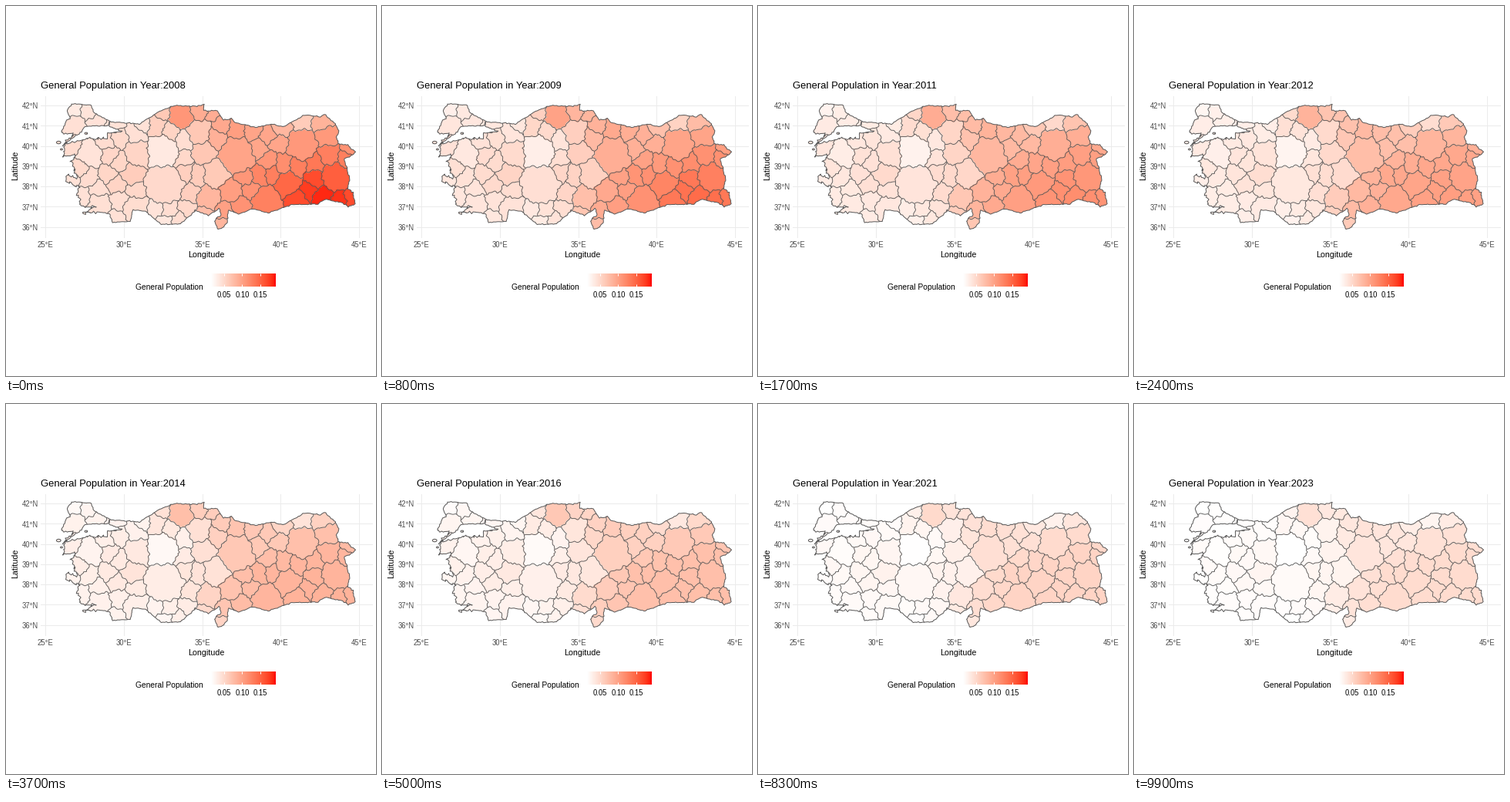
Write a matplotlib script that moves like this. It is 480x480 px and loops after 10 s.

```python
import math

import matplotlib.pyplot as plt
import numpy as np
from matplotlib.animation import FuncAnimation
from matplotlib.collections import LineCollection, PatchCollection
from matplotlib.patches import PathPatch
from matplotlib.path import Path

SIZE, DPI, FRAMES = 480, 72, 100
GREY = "#595959"
SMALL = 9  # radius in pixels of an ordinary province
rng = np.random.default_rng(5)
plt.rcParams["font.family"] = "Liberation Sans"


def to_px(lon, lat):
    return 51 + 20.35 * (lon - 25), 129 + 26.25 * (42 - lat)


def lab_ramp(level):
    """White to red, interpolated in CIELAB."""
    f = np.clip(level, 0, 1)[:, None]
    light, a, b = (np.array([100, 0, 0]) + f * np.array([-46.76, 80.09, 67.2])).T
    fy = (light + 16) / 116
    t = np.stack([fy + a / 500, fy, fy - b / 200], axis=1)
    xyz = np.where(t > 6 / 29, t**3, 3 * (6 / 29) ** 2 * (t - 4 / 29))
    xyz = xyz * [0.95047, 1, 1.08883]
    to_rgb = np.array([[3.2406, -1.5372, -0.4986],
                       [-0.9689, 1.8758, 0.0415],
                       [0.0557, -0.2040, 1.0570]])
    rgb = np.clip(xyz @ to_rgb.T, 0, 1)
    return np.clip(np.where(rgb > 0.0031308, 1.055 * rgb ** (1 / 2.4) - 0.055,
                            12.92 * rgb), 0, 1)


# Key points of the coast and land frontier, clockwise, as (lon, lat)
THRACE = [
    (26.05, 40.73), (26.35, 41.25), (26.6, 41.35), (26.4, 41.75), (26.7, 42.07),
    (27.9, 42.02), (28.1, 41.63), (29.1, 41.23), (29.0, 41.0), (27.5, 40.97),
    (27.3, 40.7), (26.2, 40.08), (26.8, 40.63), (26.1, 40.6)]
BLACK_SEA = [
    (29.1, 41.2), (31.0, 41.08), (32.3, 41.73), (33.3, 42.0), (34.7, 41.95),
    (35.1, 42.07), (35.1, 41.75), (35.97, 41.73), (36.35, 41.27), (36.85, 41.35),
    (37.1, 41.15), (38.4, 40.92), (39.4, 41.08), (40.2, 40.95), (41.5, 41.53)]
EAST = [
    (42.5, 41.45), (42.8, 41.55), (43.45, 41.1), (43.73, 40.75), (43.55, 40.45),
    (43.7, 40.12), (44.3, 40.03), (44.78, 39.7), (44.42, 39.45), (44.05, 39.38),
    (44.4, 38.35), (44.25, 37.9), (44.6, 37.7), (44.75, 37.13), (44.3, 37.0),
    (43.9, 37.2), (42.8, 37.35), (42.35, 37.12), (40.7, 37.1), (39.2, 36.68),
    (38.2, 36.9), (37.4, 36.65), (36.65, 36.83), (36.6, 36.22), (36.38, 35.98)]
SOUTH = [
    (36.0, 35.88), (35.8, 36.3), (36.2, 36.6), (36.1, 36.9), (35.4, 36.57),
    (34.6, 36.8), (33.6, 36.15), (32.4, 36.12), (31.4, 36.77), (30.6, 36.85),
    (30.4, 36.28), (29.3, 36.22), (29.1, 36.65), (28.2, 36.75)]
AEGEAN = [
    (27.4, 36.67), (28.25, 37.0), (27.3, 37.05), (27.0, 37.68), (27.2, 37.95),
    (26.3, 38.25), (26.4, 38.6), (27.0, 38.43), (26.65, 39.28), (26.95, 39.55),
    (26.1, 39.47), (26.3, 40.1), (27.75, 40.35), (28.95, 40.37), (28.98, 40.63),
    (29.9, 40.72), (29.05, 40.98)]
ISLANDS = [(25.85, 40.17, 3, 1.8), (26.03, 39.83, 1.5, 1), (27.6, 40.62, 2, 1.2)]

# Large provinces: lon, lat and radius in pixels
LARGE = [
    (32.6, 38.1, 24), (32.5, 39.7, 20), (37.2, 39.5, 21), (41.4, 40.0, 18),
    (43.5, 38.5, 17), (39.1, 37.3, 17), (40.4, 38.1, 15), (42.7, 37.45, 12),
    (41.0, 37.3, 12), (30.8, 36.9, 15), (30.9, 39.6, 14), (27.9, 39.6, 14),
    (35.9, 38.6, 16), (33.6, 41.5, 14), (35.1, 39.7, 13), (34.8, 40.6, 13),
    (35.4, 37.4, 13), (36.9, 37.8, 13), (28.4, 37.1, 13), (30.5, 38.6, 13),
    (43.1, 39.6, 13), (43.0, 40.4, 12)]

# Hills and hollows of the 2008 level: lon, lat, half widths, height
HILLS = [
    (31.0, 38.9, 3.0, 1.3, 0.11), (42.7, 37.5, 3.9, 1.7, 0.50),
    (33.7, 41.5, 1.2, 0.7, 0.36), (32.5, 39.8, 1.2, 0.7, -0.12),
    (35.8, 38.6, 0.8, 0.7, -0.18), (41.0, 41.3, 1.6, 0.5, -0.20),
    (43.7, 39.7, 1.2, 0.5, 0.10)]


def first_level(lon, lat):
    level = 0.15 + 0.31 / (1 + np.exp(-(lon - 35) / 0.6))
    for x, y, wide, high, height in HILLS:
        level = level + height * np.exp(-((lon - x) / wide) ** 2
                                        - ((lat - y) / high) ** 2)
    return level


def level_after(start, years):
    """Hot spots cool within a few years, the rest fades slowly."""
    base = np.minimum(start, 0.6)
    hot = start - base
    return (base * math.exp(-years / 16) + hot * math.exp(-years / 2)
            - 0.05 * (1 - math.exp(-years / 3)))


def rough_coast(points):
    pts = np.array([to_px(*p) for p in points])
    out = []
    for p, q in zip(pts, np.roll(pts, -1, axis=0)):
        n = max(1, math.ceil(np.hypot(*(q - p)) / 2.2))
        amp = 1.1 if p[0] < 125 and p[1] > 165 else 0.4
        t = np.arange(n)[:, None] / n
        out.append(p + (q - p) * t + rng.normal(0, amp, (n, 2)))
    out = np.vstack(out)
    return np.vstack([out, out[:1]])


def island(lon, lat, rx, ry):
    angle = np.linspace(0, 2 * np.pi, 9)
    x, y = to_px(lon, lat)
    return np.column_stack([x + rx * np.cos(angle), y + ry * np.sin(angle)])


def scatter_provinces(shores):
    """Large provinces first, then small ones wherever there is room on land."""
    discs = [(complex(*to_px(lon, lat)), r) for lon, lat, r in LARGE]
    for x, y in rng.uniform((65, 120), (460, 295), (6000, 2)):
        z = complex(x, y)
        on_land = any(shore.contains_point((x, y)) for shore in shores)
        if on_land and all(abs(z - c) > r + SMALL - 2 for c, r in discs):
            discs.append((z, SMALL))
    return discs


def clip(cell, normal, offset, label):
    """Keep the part of a cell behind a line; each corner labels the edge it starts."""
    def side(z):
        return (normal.conjugate() * z).real - offset

    out = []
    for (p, edge), (q, _) in zip(cell, cell[1:] + cell[:1]):
        a, b = side(p), side(q)
        if a <= 0:
            out.append((p, edge))
            if b > 0:
                out.append((p + (q - p) * a / (a - b), label))
        elif b <= 0:
            out.append((p + (q - p) * a / (a - b), edge))
    return out


def power_cell(i, discs):
    home, r = discs[i]
    cell = [(z, -1) for z in (0, SIZE, SIZE + SIZE * 1j, SIZE * 1j)]
    for j, (other, s) in enumerate(discs):
        if j != i:
            offset = (abs(other) ** 2 - abs(home) ** 2 + r * r - s * s) / 2
            cell = clip(cell, other - home, offset, j)
    return cell


def meander(p, q):
    """Points from p to q, bent by a smooth field so that borders look natural."""
    z = p + (q - p) * np.linspace(0, 1, math.ceil(abs(q - p) / 1.2) + 1)
    x, y = z.real, z.imag
    dx = 1.2 * np.sin(.33 * y + .17 * x) + .8 * np.sin(.91 * y - .38 * x + 1)
    dy = 1.2 * np.sin(.37 * x - .21 * y + 2) + .8 * np.sin(.83 * x + .45 * y)
    return np.column_stack([x + dx, y + dy])


coasts = [rough_coast(THRACE), rough_coast(BLACK_SEA + EAST + SOUTH + AEGEAN)]
shores = [Path(c, closed=True) for c in coasts]
discs = scatter_provinces(shores)
coasts += [island(*spec) for spec in ISLANDS]
land = Path.make_compound_path(*[Path(c, closed=True) for c in coasts])

shapes, borders = [], []
for i in range(len(discs)):
    cell = power_cell(i, discs)
    outline = []
    for (p, j), (q, _) in zip(cell, cell[1:] + cell[:1]):
        line = meander(p, q)
        outline.append(line)
        if j > i:
            borders.append(line)
    ring = np.vstack(outline)
    shapes.append(PathPatch(Path(np.vstack([ring, ring[:1]]), closed=True)))

centres = np.array([z for z, _ in discs])
start = first_level(25 + (centres.real - 51) / 20.35, 42 - (centres.imag - 129) / 26.25)
start = start + rng.normal(0, 0.02, len(start))

fig = plt.figure(figsize=(SIZE / DPI, SIZE / DPI), dpi=DPI, facecolor="white")
ax = fig.add_axes([0, 0, 1, 1])


def label(x, y, text, size, color="black", ha="left", **kw):
    return ax.text(x, y, text, fontsize=size, color=color, ha=ha, **kw)


grid = dict(color="#EBEBEB", lw=1, zorder=0)
for lat in range(36, 43):
    y = to_px(25, lat)[1]
    ax.plot([45, 475], [y, y], **grid)
    label(42, y + 4.3, f"{lat}°N", 9.5, "#4D4D4D", "right")
for lon in range(25, 46, 5):
    x = to_px(lon, 42)[0]
    ax.plot([x, x], [117, 300], **grid)
    label(x, 313, f"{lon}°E", 9.5, "#4D4D4D", "center")

title = label(45, 107, "", 13)
label(260, 326, "Longitude", 10.6, ha="center")
label(12, 207, "Latitude", 10.6, ha="center", va="center", rotation=90)
label(168, 368, "General Population", 10.3)

ramp = lab_ramp(np.linspace(0, 1, 84))[None]
ax.imshow(ramp, extent=(266, 350, 364, 347), aspect="auto", interpolation="nearest")
for value in (0.05, 0.10, 0.15):
    x = 266 + 84 * (value - 0.0135) / 0.1802
    for top in (347, 360.6):
        ax.plot([x, x], [top, top + 3.4], color="white", lw=1, solid_capstyle="butt")
    label(x, 378, f"{value:.2f}", 9.5, ha="center")

fills = PatchCollection(shapes, linewidths=0.5, antialiased=False, zorder=2)
lines = LineCollection(borders, colors=GREY, linewidths=0.9, zorder=3)
for artist in (fills, lines):
    ax.add_collection(artist)
    artist.set_clip_path(land, ax.transData)
ax.add_collection(LineCollection(coasts, colors=GREY, linewidths=1, zorder=4))
ax.set(xlim=(0, SIZE), ylim=(SIZE, 0))
ax.axis("off")


def update(frame):
    years = 15 * frame / (FRAMES - 1)
    colors = lab_ramp(level_after(start, years))
    fills.set_facecolor(colors)
    fills.set_edgecolor(colors)
    title.set_text(f"General Population in Year:{round(2008 + years)}")
    return fills, title


anim = FuncAnimation(fig, update, frames=FRAMES, interval=100, repeat=True,
                     repeat_delay=0, blit=False)
plt.show()
```
